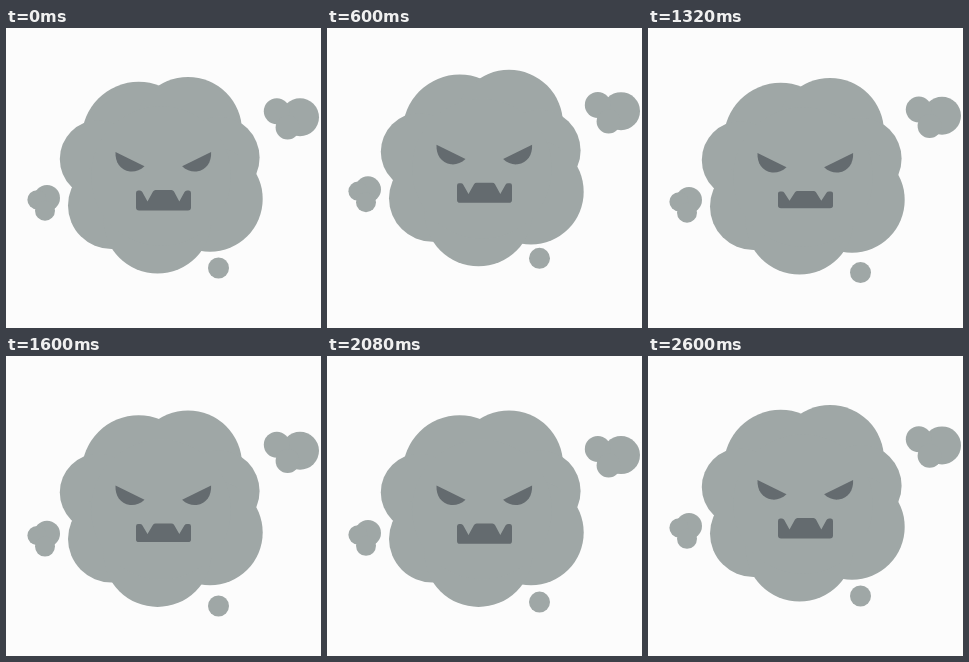
Recreate the animation shown at these times as an HTML page. Size 315x300 px, loop 2.64 s.

```html
<!DOCTYPE html>
<html lang="en">
<head>
<meta charset="utf-8">
<title>Grumpy cloud</title>
<style>
  html, body { margin: 0; height: 100%; overflow: hidden; background: #fcfcfc; }
  svg { display: block; width: 315px; height: 300px; }
</style>
</head>
<body>
<svg viewBox="0 0 315 300" fill="#9fa7a6">
  <g id="puffRight">
    <circle cx="294" cy="89.3" r="19"/>
    <circle cx="270.8" cy="83.2" r="13"/>
    <circle cx="281.6" cy="99.6" r="12"/>
  </g>
  <g id="puffLeft">
    <circle cx="41" cy="170" r="13"/>
    <circle cx="31" cy="171.8" r="9.6"/>
    <circle cx="39" cy="182.8" r="10"/>
  </g>
  <circle id="dot" cx="212.5" cy="240" r="10.5"/>
  <g id="body">
    <circle cx="132.7" cy="110.8" r="57"/>
    <circle cx="182" cy="103" r="54"/>
    <circle cx="92.7" cy="131" r="38.9"/>
    <circle cx="212.6" cy="129.6" r="41"/>
    <circle cx="105.5" cy="177.5" r="43.5"/>
    <circle cx="204" cy="171" r="52.7"/>
    <circle cx="151.5" cy="191.5" r="54"/>
    <circle cx="155" cy="148" r="70"/>
    <g fill="#646b6f">
      <path id="eye" d="M109.5 124L138.5 138.3C134 142.5 129 144 124 143.5C114 142 109 134 109.5 124Z"/>
      <use href="#eye" transform="translate(314.6 0) scale(-1 1)"/>
      <g transform="translate(0 162)">
        <path id="mouth" d="M132 .5H134Q135.5 .5 136.3 2L141.5 11.5L147 1.5Q148 0 149.5 0H165.5Q167 0 168 1.5L173.3 11.5L178.5 2Q179.3 .5 181 .5H183Q185 .5 185 3V17.5Q185 20.4 182 20.4H133Q130 20.4 130 17.5V3Q130 .5 132 .5Z"/>
      </g>
    </g>
  </g>
</svg>
<script>
const LOOP = 2640;

// Each track is a list of [time, value] keys, eased in and out between keys.
const drift = {
  body: [[0, 0], [670, -7.4], [1840, 6.9], [LOOP, 0]],
  puffRight: [[0, 0], [880, -8], [1980, 10.4], [LOOP, 0]],
  puffLeft: [[0, 0], [690, -9], [1810, 9.3], [LOOP, 0]],
  dot: [[0, 0], [630, -9.7], [1720, 10.6], [2520, 0], [LOOP, 0]]
};
const mouthScale = [[0, 1], [400, 1], [1200, 0.84], [2080, 1], [LOOP, 1]];

const byId = id => document.getElementById(id);

function sample(keys, time) {
  const next = keys.findIndex(key => key[0] > time);
  const [t0, v0] = keys[next - 1];
  const [t1, v1] = keys[next];
  const eased = (1 - Math.cos(Math.PI * (time - t0) / (t1 - t0))) / 2;
  return v0 + (v1 - v0) * eased;
}

function draw() {
  const time = performance.now() % LOOP;
  for (const id in drift) {
    byId(id).setAttribute('transform', `translate(0 ${sample(drift[id], time)})`);
  }
  byId('mouth').setAttribute('transform', `scale(1 ${sample(mouthScale, time)})`);
  requestAnimationFrame(draw);
}
draw();
</script>
</body>
</html>
```
